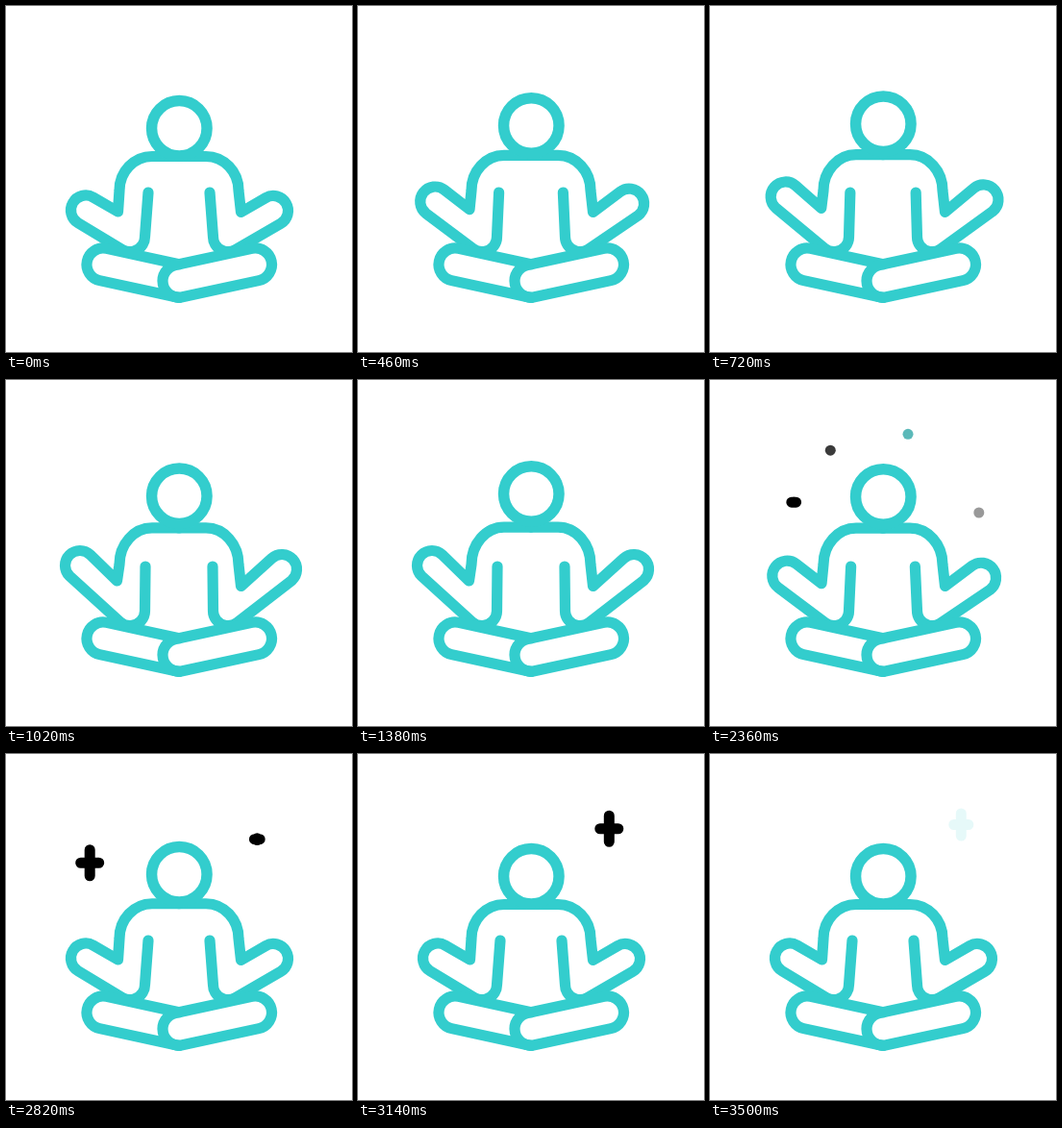
Write an HTML page with a canvas that moves like this. It is 360x360 px and loops after 3.6 s.

```html
<!DOCTYPE html>
<html lang="en">
<head>
<meta charset="utf-8">
<title>Meditation</title>
<style>
html, body { margin: 0; width: 100%; height: 100%; overflow: hidden; background: #fff; }
canvas { display: block; width: 360px; height: 360px; }
</style>
</head>
<body>
<canvas id="stage" width="360" height="360"></canvas>
<script>
const ctx = document.getElementById('stage').getContext('2d');
const LOOP = 3600, LAST = 3500, STEP = 20;
const TEAL = [51, 205, 205];
const LINE = 11.2, ARM_R = 15.5, LEG_R = 17;

const clamp = v => Math.max(0, Math.min(1, v));
const ramp = (t, a, b) => clamp((t - a) / (b - a));
const lerp = (a, b, k) => a + (b - a) * k;
const lerpPt = (p, q, k) => p.map((v, i) => lerp(v, q[i], k));
const easeOut = k => 1 - (1 - k) * (1 - k);
const blackToTeal = k => `rgb(${TEAL.map(v => Math.round(v * k)).join(',')})`;

// Each side is described as the left one; the right side is drawn mirrored.
const sides = [
  { mirror: false, hand: [[83, 212.5], [77, 193]], pit: [[116.5, 214], [115.5, 209]] },
  { mirror: true, hand: [[82, 213], [73, 197]], pit: [[115.5, 214.5], [115.5, 214.5]] }
];

// Rise, hold, return
const pose = (t, upEnd, downEnd) => ramp(t, 0, upEnd) * (1 - ramp(t, 2010, downEnd));

function drawArm(side, lift, shoulderY) {
  const hand = lerpPt(...side.hand, lift);
  const pit = lerpPt(...side.pit, lift);
  const elbow = [129, 240.2], sideY = 192;
  const dx = pit[0] - hand[0], dy = pit[1] - hand[1];
  const upper = Math.atan2(dy, dx) - Math.acos(ARM_R / Math.hypot(dx, dy));
  const lower = Math.atan2(elbow[1] - hand[1], elbow[0] - hand[0]) + Math.PI / 2;

  ctx.beginPath();
  ctx.moveTo(180, shoulderY);
  ctx.lineTo(152, shoulderY);
  ctx.bezierCurveTo(133, shoulderY, 118, lerp(shoulderY, sideY, 0.45), 118, sideY);
  ctx.lineTo(...pit);
  ctx.arc(...hand, ARM_R, upper, lower, true);
  ctx.arc(...elbow, ARM_R, lower, 0, true);
  ctx.lineTo(lerp(148, 145, lift), 194);
  ctx.stroke();
}

function drawLegs() {
  const y1 = 269, y2 = 286.1, tilt = Math.atan2(y2 - y1, 79);
  const gap = LEG_R / Math.cos(tilt);
  const up = -Math.PI / 2, down = Math.PI / 2;

  ctx.beginPath();
  ctx.moveTo(180, y2 - gap);
  ctx.arc(101, y1, LEG_R, up + tilt, down + tilt, true);
  ctx.lineTo(180, y2 + gap);
  ctx.stroke();

  ctx.beginPath();
  ctx.arc(180, y2, LEG_R, down - tilt, up - tilt + 2 * Math.PI);
  ctx.arc(259.5, y1, LEG_R, up - tilt, down - tilt);
  ctx.closePath();
  ctx.stroke();
}

function drawFigure(t) {
  const arms = pose(t, 1000, 2650);
  const breath = pose(t, 1390, 3050);
  ctx.strokeStyle = blackToTeal(1);
  ctx.lineWidth = LINE;
  for (const side of sides) {
    ctx.save();
    if (side.mirror) {
      ctx.translate(360, 0);
      ctx.scale(-1, 1);
    }
    drawArm(side, arms, lerp(156.5, 153, breath));
    ctx.restore();
  }
  drawLegs();
  ctx.lineWidth = 11.5;
  ctx.beginPath();
  ctx.arc(180.3, lerp(127.3, 118.5, breath), 28.75, 0, 2 * Math.PI);
  ctx.stroke();
}

function drawDot(t, x, y, start) {
  const age = t - start;
  const alpha = ramp(age, 0, 200) * (1 - ramp(age, 185, 505));
  if (alpha <= 0) return;
  ctx.globalAlpha = alpha;
  ctx.fillStyle = blackToTeal(ramp(age, 160, 285));
  ctx.beginPath();
  ctx.arc(x, y, 5.5, 0, 2 * Math.PI);
  ctx.fill();
  ctx.globalAlpha = 1;
}

function drawPlus(t, x, base, start) {
  const age = t - start;
  const alpha = 1 - ramp(age, 500, 762);
  if (age <= 0 || alpha <= 0) return;
  const y = base - 17.5 * easeOut(ramp(age, 0, 730));
  const shrink = 2 * ramp(age, 500, 730);
  const w = lerp(0.2, 9.5, easeOut(ramp(age, 0, 320))) - shrink;
  const h = lerp(0.1, 13.5, easeOut(ramp(age, 40, 360))) - shrink;
  ctx.globalAlpha = alpha;
  ctx.strokeStyle = blackToTeal(ramp(age, 500, 660));
  ctx.lineWidth = 11;
  ctx.beginPath();
  ctx.moveTo(x - w, y);
  ctx.lineTo(x + w, y);
  ctx.moveTo(x, y - h);
  ctx.lineTo(x, y + h);
  ctx.stroke();
  ctx.globalAlpha = 1;
}

function draw(now) {
  const t = Math.min(LAST, Math.floor((now % LOOP) / STEP) * STEP);
  ctx.fillStyle = '#fff';
  ctx.fillRect(0, 0, 360, 360);
  ctx.lineCap = ctx.lineJoin = 'round';
  drawFigure(t);
  drawDot(t, 206, 56.3, 2100);
  drawDot(t, 125.3, 73.2, 2206);
  drawDot(t, 279.8, 138, 2280);
  drawPlus(t, 87.2, 129, 2320);
  drawPlus(t, 261.3, 91, 2770);
}

const begin = performance.now();
function tick() {
  draw(performance.now() - begin);
  requestAnimationFrame(tick);
}
tick();
</script>
</body>
</html>
```
